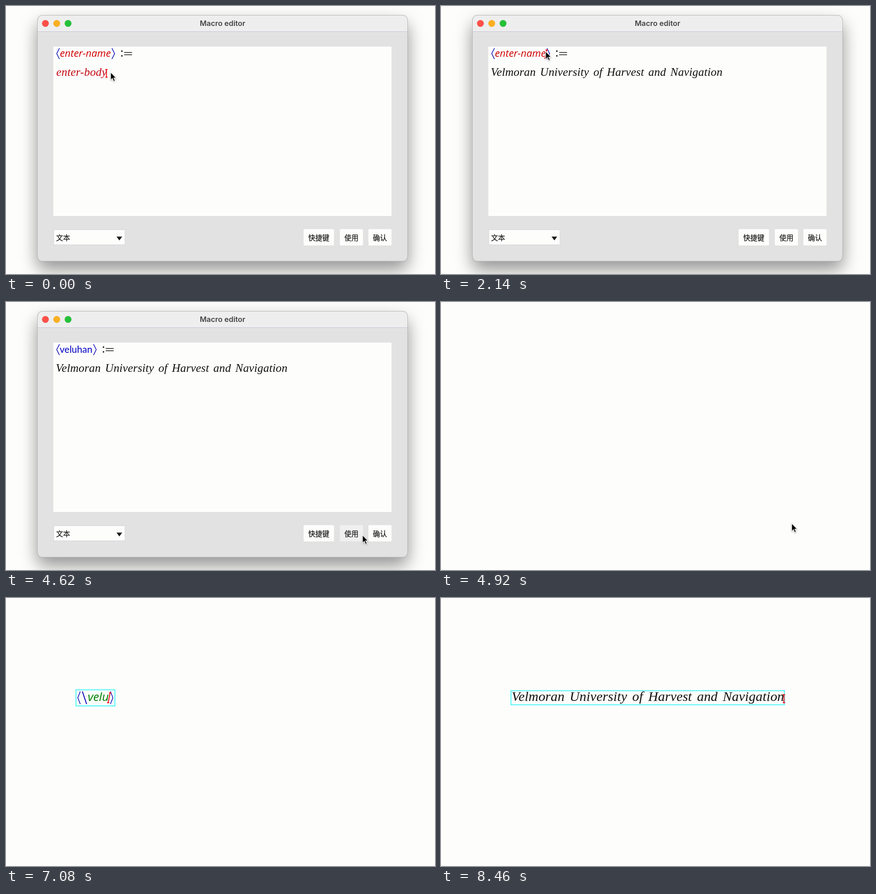
Write an HTML page that moves like this. It is 947x591 px and loops after 8480 ms.

```html
<!DOCTYPE html>
<html lang="zh">
<head>
<meta charset="utf-8">
<title>Macro editor</title>
<style>
  html, body { margin: 0; width: 100%; height: 100%; overflow: hidden; background: #fdfdfc; }
  svg { display: block; width: 947px; height: 591px; }
  text { white-space: pre; }
  .ui { font: 500 15.5px "Noto Sans CJK SC", "Noto Sans CJK", sans-serif; fill: #1c1c1c; stroke: #1c1c1c; stroke-width: .25; }
  .title { font: 600 16.4px Inter, sans-serif; fill: #444; }
  .serif { font: italic 25.5px "Liberation Serif", serif; letter-spacing: .007em; word-spacing: .12em; }
  .slant { font: italic 22px "Open Sans", sans-serif; fill: #cf0000; }
  .plain { font: 21px Lato, sans-serif; fill: #0000c4; }
  .cmd { font: italic 26px "Open Sans", sans-serif; fill: #008000; }
  .big { font-size: 30px; }
  .line { fill: none; stroke: #0000b4; stroke-width: 1.5; }
  .caret { fill: none; stroke: #f01018; stroke-width: 2; }
  .frame { fill: none; stroke: #20f4f8; stroke-width: 1.6; }
  .shadow { filter: drop-shadow(0 18px 19px rgba(0,0,0,.36)) drop-shadow(0 0 1px rgba(0,0,0,.25)); }
</style>
</head>
<body>
<svg viewBox="0 0 947 591">
  <rect width="947" height="591" fill="#fdfdfc"/>
  <g id="win">
    <rect class="shadow" x="70" y="21" width="816" height="541.5" rx="10" fill="#e2e2e2"/>
    <path d="M70 56V31a10 10 0 0 1 10-10H876a10 10 0 0 1 10 10V56Z" fill="#eeeeee"/>
    <path d="M70 56.5H886" stroke="#c6c4d6"/>
    <rect x="69.5" y="20.5" width="817" height="542.5" rx="10.5" fill="none" stroke="#b9b9b9"/>
    <g stroke="#000" stroke-opacity=".08" stroke-width=".6">
      <circle cx="87" cy="38.5" r="7.5" fill="#ff5048"/>
      <circle cx="112" cy="38.5" r="7.5" fill="#fdb022"/>
      <circle cx="137" cy="38.5" r="7.5" fill="#24c138"/>
    </g>
    <text class="title" x="478" y="43.5" text-anchor="middle">Macro editor</text>
    <rect x="104.5" y="89.5" width="746.5" height="373.5" fill="#fdfdfc"/>
    <rect x="105.5" y="493.5" width="157" height="33" fill="#fdfdfc" stroke="#d6d6da"/>
    <text class="ui" x="110.5" y="516.5">文本</text>
    <path d="M244 508.5H256.5L250.2 517Z" fill="#1c1c1c"/>
    <g id="buttons"></g>
    <path class="line" d="M118 93L112 105L118 117"/>
    <text id="hint" class="slant" x="119" y="111.5">enter-name</text>
    <text id="name" class="plain" x="118.5" y="111.5"></text>
    <g id="assign">
      <path class="line" d="M0 93L6 105L0 117"/>
      <g fill="#111"><circle cx="22" cy="99.5" r="1.7"/><circle cx="22" cy="110" r="1.7"/></g>
      <path d="M27 102.5H44.5M27 107.5H44.5" stroke="#111" stroke-width="1.4"/>
    </g>
    <text id="bodyHint" class="serif" x="111" y="154" fill="#c20a14">enter-body</text>
    <text id="body" class="serif" x="110" y="154" fill="#111"></text>
  </g>
  <g id="cmd">
    <rect id="cmdBox" class="frame" x="154.5" y="202.5" height="35.5"/>
    <path class="line" d="M164 206L158.5 220L164 234"/>
    <path class="line" style="stroke-width:2" d="M168.5 206L178 234"/>
    <text id="typed" class="cmd" x="180.5" y="227"></text>
    <path id="cmdEnd" class="line" d="M0 206L5.5 220L0 234"/>
  </g>
  <g id="result">
    <rect id="resBox" class="frame" x="154.5" y="204.5" height="31"/>
    <text id="full" class="serif big" x="156" y="227" fill="#111"></text>
  </g>
  <path id="caret" class="caret"/>
  <g id="mouse">
    <path d="M0 0V17.5L4 13.8L6.8 20.3L9.8 19L7 12.7H12.3Z" fill="#000" stroke="#fff" stroke-width="1.2"
      style="filter:drop-shadow(0 1.5px 1.5px rgba(0,0,0,.35))"/>
  </g>
</svg>
<script>
const LOOP = 8480;
const PLACE = 'Velmoran University of Harvest and Navigation';
const MACRO = 'veluhan';
const PASTE = 900, FOCUS_NAME = 2000, CLOSE = 4820, CLICK = 5560, SLASH = 5700, EXPAND = 7880;
const nameKeys = [2480, 2640, 2800, 2960, 3120, 3280, 3440];
const cmdKeys = [6440, 6640, 6820, 7000, 7200, 7320, 7440];
const route = [
  [1300, 231, 146], [1900, 231, 100], [3850, 231, 100], [4620, 787, 514],
  [4710, 813, 514], [4820, 813, 514], [5160, 630, 392], [5380, 624, 392]
];

const el = id => document.getElementById(id);
const show = (node, on) => node.setAttribute('visibility', on ? 'visible' : 'hidden');
const move = (node, x, y) => node.setAttribute('transform', `translate(${x} ${y})`);
const count = (keys, t) => keys.filter(k => t >= k).length;
const within = (t, a, b) => t >= a && t < b;
const endOf = node => +node.getAttribute('x') + node.getComputedTextLength();

const buttons = [[657, 67, '快捷键'], [737, 51, '使用'], [800, 51, '确认']].map(([x, w, label]) => {
  const g = document.createElementNS('http://www.w3.org/2000/svg', 'g');
  g.innerHTML = `<rect x="${x}" y="492" width="${w}" height="36" rx="2"/>` +
    `<text class="ui" x="${x + w / 2}" y="516.5" text-anchor="middle">${label}</text>`;
  el('buttons').append(g);
  return { x, w, rect: g.firstChild };
});

const [win, hint, name, assign, bodyHint, body, cmd, cmdBox, typed, cmdEnd, result, resBox, full, caret, mouse] =
  ['win', 'hint', 'name', 'assign', 'bodyHint', 'body', 'cmd', 'cmdBox', 'typed', 'cmdEnd',
   'result', 'resBox', 'full', 'caret', 'mouse'].map(el);
body.textContent = full.textContent = PLACE;

function pointer(t) {
  let [, x, y] = route[0];
  for (let i = 1; i < route.length; i++) {
    const [t0, x0, y0] = route[i - 1], [t1, x1, y1] = route[i];
    if (t < t0) break;
    const p = Math.min(1, (t - t0) / (t1 - t0)), e = p * p * (3 - 2 * p);
    x = x0 + (x1 - x0) * e;
    y = y0 + (y1 - y0) * e;
  }
  return [x, y];
}

// I-beam from top to bottom, leaning right by `lean`
function drawCaret(x, top, bottom, lean = 0) {
  caret.setAttribute('d', `M${x + lean - 2.5} ${top}h5M${x + lean} ${top}L${x} ${bottom}M${x - 2.5} ${bottom}h5`);
}

function render(t) {
  const open = t < CLOSE, pasted = t >= PASTE;
  const named = count(nameKeys, t), keyed = count(cmdKeys, t);

  show(win, open);
  show(hint, open && !named);
  show(name, open && named > 0);
  show(bodyHint, open && !pasted);
  show(body, open && pasted);
  name.textContent = MACRO.slice(0, named);
  const nameEnd = endOf(named ? name : hint);
  move(assign, nameEnd + 2.5, 0);

  show(cmd, within(t, SLASH, EXPAND));
  typed.textContent = MACRO.slice(0, keyed);
  const cmdX = keyed ? endOf(typed) : 180.5;
  move(cmdEnd, cmdX + 3.5, 0);
  cmdBox.setAttribute('width', cmdX + 13.5 - 154.5);

  show(result, t >= EXPAND);
  const fullEnd = endOf(full);
  resBox.setAttribute('width', fullEnd + 0.5 - 154.5);

  show(caret, t < 4100 || t >= CLICK);
  if (t < PASTE) drawCaret(endOf(bodyHint) - 1, 140, 157);
  else if (t < FOCUS_NAME) drawCaret(endOf(body), 140, 157);
  else if (!named) drawCaret(nameEnd - 1, 97, 115, 3);
  else if (t < CLICK) drawCaret(nameEnd + 1, 93, 115);
  else if (t < SLASH) drawCaret(152, 211, 230);
  else if (t < EXPAND) drawCaret(cmdX - (keyed ? 1.5 : 0), keyed ? 209 : 213, 231, keyed ? 4.5 : 3.5);
  else drawCaret(fullEnd - 0.5, 213, 231);

  const [x, y] = pointer(t);
  move(mouse, x, y);
  show(mouse, t < nameKeys[0] || within(t, 3850, SLASH));
  for (const b of buttons) {
    const over = within(x, b.x, b.x + b.w) && within(y, 492, 528);
    b.rect.setAttribute('fill', over ? '#f0f0f0' : '#fdfdfc');
  }
}

function tick() {
  render(performance.now() % LOOP);
  requestAnimationFrame(tick);
}
tick();
</script>
</body>
</html>
```
